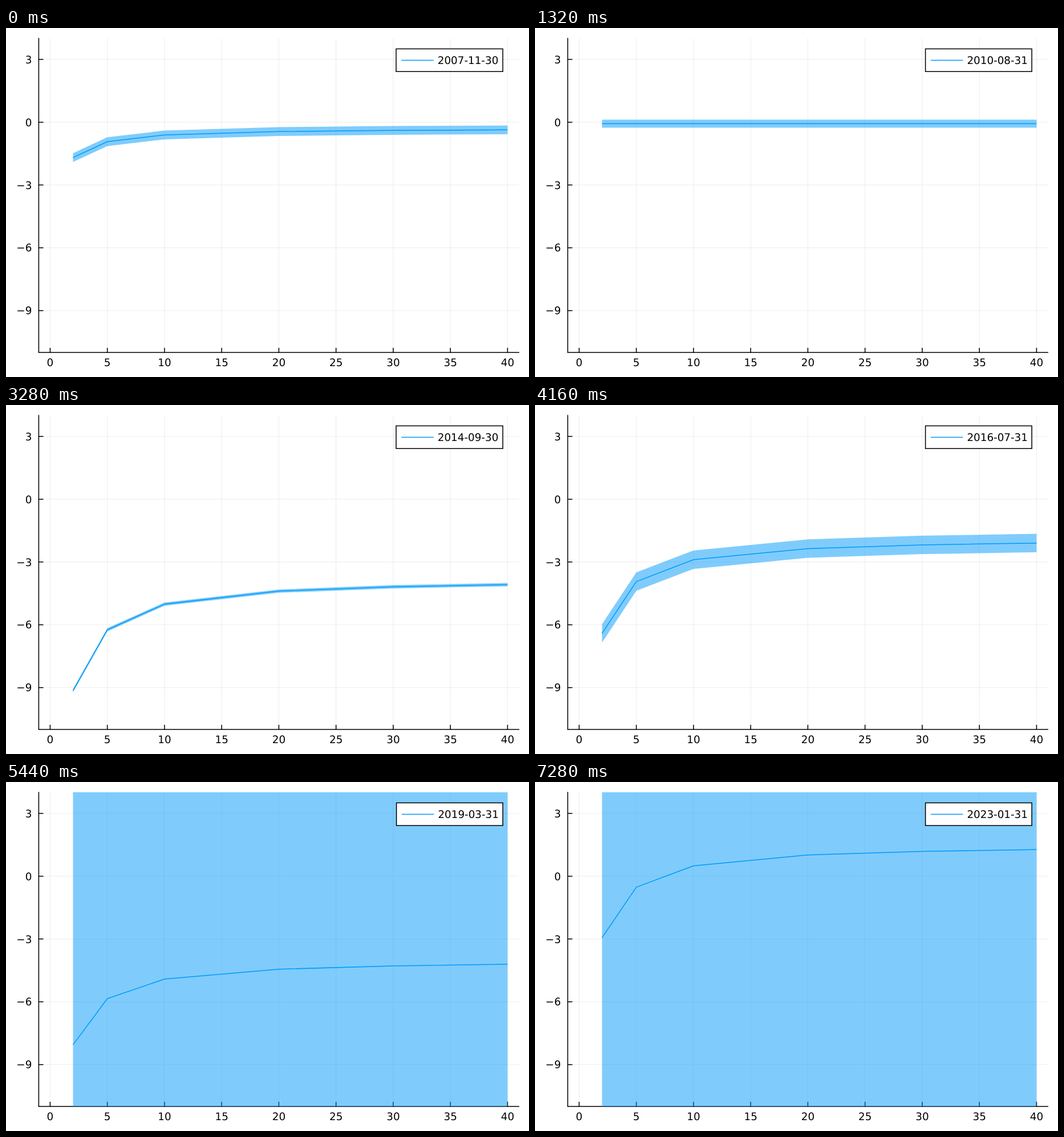
Write an HTML page that moves like this. It is 917x611 px and loops after 7320 ms.

```html
<!DOCTYPE html>
<html lang="en">
<head>
<meta charset="utf-8">
<title>Monthly curve</title>
<style>
  html, body { margin: 0; width: 100%; height: 100%; overflow: hidden; background: #fff; }
  svg { display: block; width: 917px; height: 611px; }
  text { font: 18.33px "DejaVu Sans", sans-serif; fill: #000; text-rendering: geometricPrecision; }
  .grid { stroke: #000; stroke-opacity: .1; stroke-width: .76; }
  .axis { stroke: #000; stroke-width: 1.53; fill: none; stroke-linecap: round; }
  .curve { stroke: #009afa; stroke-width: 1.53; fill: none; stroke-linejoin: round; }
  #band { fill: #009afa; fill-opacity: .5; }
  #frame { fill: #fff; }
</style>
</head>
<body>
<svg viewBox="-.4 -.4 917 611">
  <clipPath id="plot"><rect x="57" y="17.6" width="842" height="550"/></clipPath>
  <g id="axes"></g>
  <g clip-path="url(#plot)">
    <path id="band"/>
    <path id="line" class="curve"/>
  </g>
  <path id="frame" class="axis"/>
  <path id="key" class="curve"/>
  <text id="date" y="62.6"></text>
</svg>
<script>
const STEP = 40, COUNT = 183;
const MATURITIES = [2, 5, 10, 20, 30, 40];
const LEFT = 57, RIGHT = 899, TOP = 17.6, BOTTOM = 567.6;
const $ = id => document.getElementById(id);
const px = x => 77 + 20.05 * x;
const py = y => 164.5 - 36.65 * y;

// month, long-run level, slope, half width of the band
const TURNS = [
  [0, -.285, 3.25, .21],
  [10, -.6, 5, .35],
  [25, 1, 0, 2.6],
  [33, -.07, 0, .19],
  [57, -5.36, 4.12, .79],
  [82, -3.77, 12.43, .08],
  [90, -4.1, 14.5, .2],
  [104, -1.83, 10.6, .44],
  [136, -3.97, 9.45, 40],
  [143, -4.3, 10.1, 40],
  [182, 1.53, 10.34, 40]
];

function drawAxes() {
  const line = (cls, x1, y1, x2, y2) =>
    `<line class="${cls}" x1="${x1}" y1="${y1}" x2="${x2}" y2="${y2}"/>`;
  const label = (x, y, anchor, value) =>
    `<text x="${x}" y="${y}" text-anchor="${anchor}">${String(value).replace("-", "\u2212")}</text>`;
  let out = "";
  for (let v = 0; v <= 40; v += 5) {
    const x = px(v);
    out += line("grid", x, TOP, x, BOTTOM) + line("axis", x, BOTTOM, x, BOTTOM - 7.6)
      + label(x, 591.5, "middle", v);
  }
  for (let v = -9; v <= 3; v += 3) {
    const y = py(v);
    out += line("grid", LEFT, y, RIGHT, y) + line("axis", LEFT, y, LEFT + 7.6, y)
      + label(45, y + 6.7, "end", v);
  }
  out += line("axis", LEFT, TOP, LEFT, BOTTOM) + line("axis", LEFT, BOTTOM, RIGHT, BOTTOM);
  $("axes").innerHTML = out;
}

// Level and slope move evenly; the band widens at a compound rate.
function stateAt(month) {
  const i = Math.max(1, TURNS.findIndex(turn => turn[0] >= month));
  const [m0, level0, slope0, half0] = TURNS[i - 1];
  const [m1, level1, slope1, half1] = TURNS[i];
  const k = (month - m0) / (m1 - m0);
  return {
    level: level0 + (level1 - level0) * k,
    slope: slope0 + (slope1 - slope0) * k,
    half: half0 * (half1 / half0) ** k
  };
}

const loading = x => (1 - Math.exp(-x)) / x;

function draw(month) {
  const { level, slope, half } = stateAt(month);
  const trace = offset => MATURITIES.map(x => [px(x), py(level - slope * loading(x) + offset)]);
  const path = points => "M" + points.map(p => p.join()).join("L");
  $("line").setAttribute("d", path(trace(0)));
  $("band").setAttribute("d", path([...trace(half), ...trace(-half).reverse()]) + "Z");

  const date = new Date(Date.UTC(2007, 11 + month, 0)).toISOString().slice(0, 10);
  const nudge = date.endsWith("1") ? .6 : 0;
  $("date").textContent = date;
  $("date").setAttribute("x", 756.4 + nudge);
  $("key").setAttribute("d", `M${692.8 + nudge} 56H${749.4 + nudge}`);
  $("frame").setAttribute("d", `M${683.6 + nudge} 36.2H870.7V75.8H${683.6 + nudge}Z`);
}

function tick(now) {
  draw(Math.floor(now / STEP) % COUNT);
  requestAnimationFrame(tick);
}

drawAxes();
draw(0);
requestAnimationFrame(tick);
</script>
</body>
</html>
```
